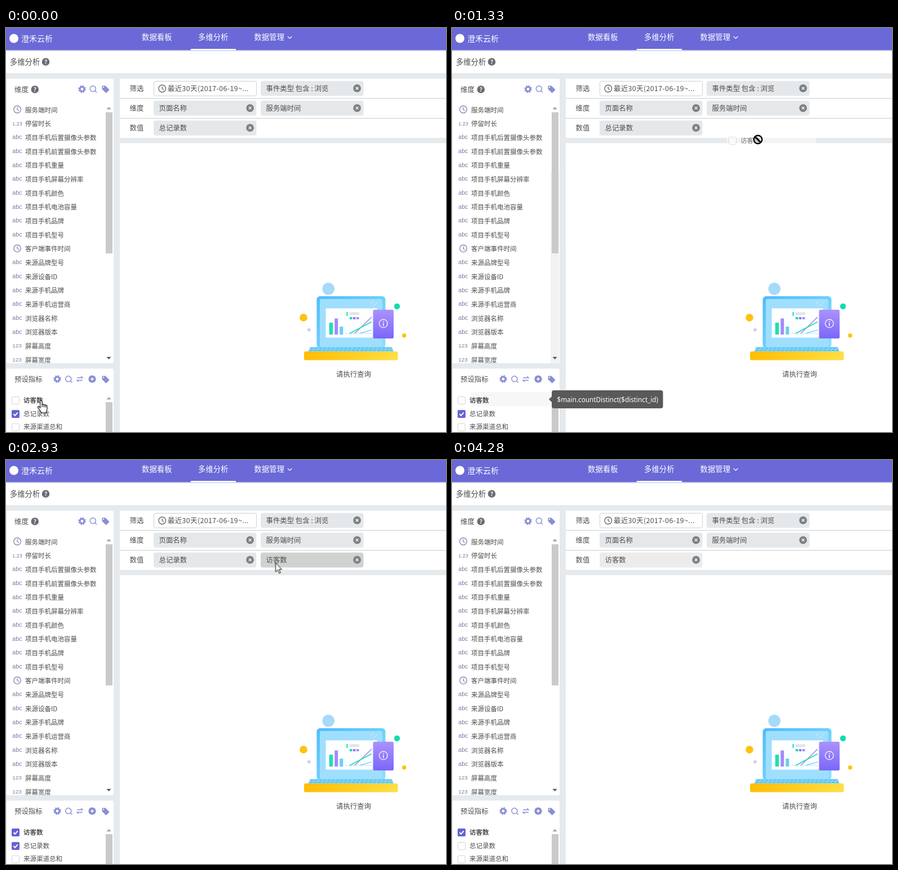
Animation, 781 px wide and 717 px high, one loop 4.96 s. Source, as an HTML page:

```html
<!DOCTYPE html>
<html lang="zh-CN">
<head>
<meta charset="utf-8">
<title>多维分析</title>
<style>
html, body { margin: 0; width: 100%; height: 100%; overflow: hidden; background: #e6eaed; }
svg { display: block; }
text { font-family: "Noto Sans CJK SC", "Noto Sans CJK", "Noto Sans", sans-serif; fill: #4c4c4c; white-space: pre; }
.nav { font-size: 13.4px; fill: #fff; font-weight: 500; }
.crumb { font-size: 13.3px; }
.mid { font-size: 12.4px; }
.small { font-size: 11.5px; }
.type { font: 10.6px "Liberation Sans", Arial, sans-serif; fill: #787ca6; }
.line { fill: none; stroke: #8a8ed2; stroke-width: 1.4; }
.solid { fill: #8a8ed2; }

.anim { animation: 4960ms step-end infinite; }
#hand { animation-name: hand; }
#arrow { animation-name: arrow; }
#nodrop { animation-name: nodrop; }
#ghost { animation-name: ghost; }
#insert { animation-name: insert; }
#tip { animation-name: tip; }
#hover { animation-name: hover; }
#track { animation-name: track; }
#second { animation-name: second; }
#first rect { animation: firstFill 4960ms step-end infinite; }
#second rect { animation: secondFill 4960ms step-end infinite; }
#total, #totalTick { animation-name: total; }
#totalTick { animation-name: totalTick; }
#guest { animation-name: guest; }
#guestTick { animation-name: guestTick; }

@keyframes hand {
  0% { transform: translate(62.5px, 661px); opacity: 1; }
  8.06% { opacity: 0; transform: none; }
  67.54% { transform: translate(437px, 177px); opacity: 1; }
  69.95% { transform: translate(434px, 176.5px); opacity: 1; }
  80.24%, 100% { opacity: 0; transform: none; }
}
@keyframes nodrop {
  0% { opacity: 0; transform: none; }
  8.06% { transform: translate(88px, 648px); opacity: 1; }
  10.48% { transform: translate(160px, 575px); opacity: 1; }
  12.9% { transform: translate(242px, 491px); opacity: 1; }
  15.92% { transform: translate(303px, 415px); opacity: 1; }
  18.95% { transform: translate(390px, 330px); opacity: 1; }
  21.57% { transform: translate(470px, 265px); opacity: 1; }
  23.99% { transform: translate(524px, 222px); opacity: 1; }
  26.81% { transform: translate(543px, 198px); opacity: 1; }
  29.23%, 100% { opacity: 0; transform: none; }
}
@keyframes ghost {
  0% { opacity: 0; transform: none; }
  8.06% { transform: translate(42px, 650px); opacity: .75; }
  10.48% { transform: translate(114px, 578px); opacity: .75; }
  12.9% { transform: translate(196px, 494px); opacity: .75; }
  15.92% { transform: translate(246px, 429px); opacity: .75; }
  18.95% { transform: translate(338px, 336px); opacity: .75; }
  21.57% { transform: translate(421px, 270px); opacity: .75; }
  23.99% { transform: translate(478px, 225px); opacity: .75; }
  26.81% { transform: translate(498px, 200px); opacity: .75; }
  29.23% { transform: translate(504px, 188px); opacity: .75; }
  31.85% { transform: translate(508px, 184px); opacity: .75; }
  44.95%, 100% { opacity: 0; transform: none; }
}
@keyframes arrow {
  0% { opacity: 0; transform: none; }
  29.23% { transform: translate(550.5px, 184.5px); opacity: 1; }
  31.85% { transform: translate(551.5px, 179.5px); opacity: 1; }
  54.03% { transform: translate(531.5px, 180.5px); opacity: 1; }
  56.45% { transform: translate(502.5px, 181.5px); opacity: 1; }
  59.07% { transform: translate(478.5px, 182.5px); opacity: 1; }
  62.09% { transform: translate(453.5px, 180.5px); opacity: 1; }
  65.12% { transform: translate(444.5px, 178.5px); opacity: 1; }
  67.54% { opacity: 0; transform: none; }
  80.24% { transform: translate(541.5px, 188.5px); opacity: 1; }
  83.26% { transform: translate(642.5px, 197.5px); opacity: 1; }
  86.29%, 100% { opacity: 0; transform: none; }
}
@keyframes insert { 0% { opacity: 0; } 29.23% { opacity: 1; } 47.98%, 100% { opacity: 0; } }
@keyframes tip { 0% { opacity: 0; } 18.95% { opacity: 1; } 51%, 100% { opacity: 0; } }
@keyframes hover { 0% { opacity: 0; } 8.06% { opacity: 1; } 47.98%, 100% { opacity: 0; } }
@keyframes track {
  0% { transform: translateY(600px); }
  12.9% { transform: translateY(483px); }
  18.95% { transform: translateY(253px); }
  47.98%, 100% { transform: translateY(600px); }
}
@keyframes second { 0% { opacity: 0; } 47.98% { opacity: 1; } 77.82%, 100% { opacity: 0; } }
@keyframes secondFill { 0% { fill: #dadddd; } 51% { fill: #d0d2d1; } 65.12%, 100% { fill: #e4e8eb; } }
@keyframes firstFill { 0% { fill: #e4e8eb; } 65.12% { fill: #d0d2d1; } 77.82% { fill: #e6eaec; } 86.29%, 100% { fill: #ececec; } }
@keyframes total { 0% { opacity: 1; } 77.82%, 100% { opacity: 0; } }
@keyframes totalTick { 0% { opacity: 1; } 83.26%, 100% { opacity: 0; } }
@keyframes guest { 0% { opacity: 0; } 77.82%, 100% { opacity: 1; } }
@keyframes guestTick { 0% { opacity: 0; } 47.98% { opacity: .6; } 51%, 100% { opacity: 1; } }
</style>
</head>
<body>
<svg width="781" height="717" viewBox="0 0 781 717">
  <defs>
    <clipPath id="listClip"><rect y="90" width="191" height="504.5"/></clipPath>
    <linearGradient id="lid" x2="1" y2="1"><stop stop-color="#4fbcfb"/><stop offset="1" stop-color="#8fe0fe"/></linearGradient>
    <linearGradient id="gold"><stop stop-color="#ffbd05"/><stop offset="1" stop-color="#ffde45"/></linearGradient>
    <linearGradient id="violet" x2="0" y2="1"><stop stop-color="#ab92fd"/><stop offset="1" stop-color="#7b66f8"/></linearGradient>
    <g id="help"><circle r="6.8" fill="#696d76"/><text y="3.6" text-anchor="middle" font-size="10" font-weight="700" style="fill:#fff">?</text></g>
    <g id="gear" class="line"><circle r="3.8" stroke-width="2.8"/><circle r="5.5" stroke-width="2.4" stroke-dasharray="2.4 1.92"/></g>
    <path id="search" class="line" d="M3 3L6 6M4.3-.7A5 5 0 1 1-5.7-.7A5 5 0 1 1 4.3-.7"/>
    <path id="tag" class="solid" fill-rule="evenodd" d="M-6-6H0L6.5.5Q7 1.2 6.4 1.9L2 6.3Q1.2 7 .5 6.4L-6 0ZM-4.6-3.4a1.2 1.2 0 1 0 2.4 0a1.2 1.2 0 1 0-2.4 0"/>
    <path id="swap" class="line" d="M-5-2.2H5L2-5M5 2.2H-5L-2 5"/>
    <g id="plus"><circle class="solid" r="6.6"/><path d="M-3 0H3M0-3V3" stroke="#fff" stroke-width="1.5"/></g>
    <g id="clock" fill="none" stroke-width="1.2"><circle r="6.3"/><path d="M0-3.8V.5L3 2"/></g>
    <g id="close"><circle r="6.9" fill="#7d8083"/><path d="M-2.3-2.3L2.3 2.3M2.3-2.3L-2.3 2.3" stroke="#fff" stroke-width="1.3"/></g>
    <rect id="box" x="-6.5" y="-6.5" width="13" height="13" rx="2" fill="#fff" stroke="#d4d4d6"/>
    <g id="tick"><rect x="-7" y="-7" width="14" height="14" rx="2" fill="#6563d5"/><path d="M-3.6 0L-1 2.8L3.8-2.6" fill="none" stroke="#fff" stroke-width="1.9"/></g>
    <path id="up" d="M-4 2.2L0-2L4 2.2Z"/>
  </defs>

  <!-- page header -->
  <rect width="781" height="717" fill="#e6eaed"/>
  <rect y="39" width="781" height="41" fill="#fff"/>
  <rect width="781" height="39.5" fill="#6a69d7"/>
  <rect y="39.5" width="781" height="1.5" fill="#cfd2ea"/>
  <circle cx="14" cy="18.5" r="8" fill="#fff"/>
  <text x="27" y="23.5" font-size="14" style="fill:#fff">澄禾云析</text>
  <text class="nav" x="241" y="21">数据看板</text>
  <text class="nav" x="341" y="21">多维分析</text>
  <text class="nav" x="440.5" y="21">数据管理</text>
  <path d="M500 15L503.7 18.7L507.4 15" fill="none" stroke="#fff" stroke-width="1.3"/>
  <rect x="328" y="37" width="80" height="2.6" fill="#fff"/>
  <text class="crumb" x="7" y="64.8">多维分析</text>
  <use href="#help" x="70.5" y="60"/>

  <!-- dimension list -->
  <rect x="1" y="90" width="190" height="505" rx="2" fill="#fff"/>
  <text class="mid" x="15" y="113.5">维度</text>
  <use href="#help" x="51.3" y="109"/>
  <use href="#gear" x="135" y="108.5"/>
  <use href="#search" x="155" y="108.5"/>
  <use href="#tag" x="176.5" y="108.5"/>
  <g clip-path="url(#listClip)">
    <rect id="track" class="anim" x="175" width="15" height="345" fill="#f2f2f2"/>
    <g id="list"></g>
  </g>
  <use href="#up" x="182.5" y="142" fill="#a0a0a0"/>
  <rect x="177" y="149.5" width="12" height="250.5" fill="#cacaca"/>
  <use href="#up" transform="translate(182.5 586) scale(1 -1)" fill="#505050"/>

  <!-- preset metrics -->
  <rect x="1" y="604.5" width="190" height="115" rx="2" fill="#fff"/>
  <text class="mid" x="15" y="628.3">预设指标</text>
  <use href="#gear" x="91" y="623"/>
  <use href="#search" x="111.5" y="623.5"/>
  <use href="#swap" x="131" y="623"/>
  <use href="#plus" x="153" y="623"/>
  <use href="#tag" x="176.5" y="623.5"/>
  <rect id="hover" class="anim" x="34" y="646" width="142" height="25" fill="#f7f7f7"/>
  <use href="#box" x="17" y="661"/>
  <use href="#box" x="17" y="685"/>
  <use href="#box" x="17" y="708.5"/>
  <g id="guestTick" class="anim"><use href="#tick" x="17" y="661"/></g>
  <g id="totalTick" class="anim"><use href="#tick" x="17" y="685"/></g>
  <text class="small" x="31" y="665" font-weight="700">访客数</text>
  <text class="small" x="31" y="688.8">总记录数</text>
  <text class="small" x="31" y="712.3">来源渠道总和</text>
  <use href="#up" x="182.5" y="657" fill="#a0a0a0"/>
  <rect x="177" y="664" width="12" height="53" fill="#cacaca"/>

  <!-- query bar -->
  <rect x="202" y="90" width="579" height="105" fill="#fff"/>
  <path d="M202 125H781M202 160.3H781" stroke="#c6cacd"/>
  <text class="mid" x="219.5" y="112">筛选</text>
  <text class="mid" x="219.5" y="147">维度</text>
  <text class="mid" x="219.5" y="182.3">数值</text>
  <rect x="262.5" y="94.5" width="182" height="26" rx="3" fill="#fff" stroke="#cdd0d2"/>
  <use href="#clock" x="277.3" y="107.5" stroke="#555"/>
  <text class="mid" x="287" y="112" letter-spacing=".4">最近30天(2017-06-19~...</text>
  <g id="chips"></g>

  <!-- empty result -->
  <rect x="202" y="204.5" width="579" height="513" fill="#fff"/>
  <circle cx="572.3" cy="462.8" r="10.8" fill="#a5daf9"/>
  <circle cx="528" cy="514" r="6.8" fill="#ffc20c"/>
  <circle cx="538" cy="535.7" r="2.9" fill="#d2caf8"/>
  <circle cx="694" cy="494" r="5.2" fill="#11dcae"/>
  <circle cx="706.7" cy="545.8" r="3.7" fill="#ffc20c"/>
  <rect x="551.5" y="476" width="122" height="92" rx="6" fill="url(#lid)"/>
  <rect x="557" y="481" width="111" height="85" rx="3" fill="#9fdffd"/>
  <path d="M646 490l6-6M652 494l7-7" stroke="#d4f1ff"/>
  <rect x="567.5" y="497.5" width="91" height="52" fill="#fcfeff"/>
  <path d="M577 544V523M577 544" stroke="#20dfae" stroke-width="6.5"/>
  <path d="M586.3 544V515.5" stroke="#a48bf8" stroke-width="6"/>
  <path d="M595.3 544V530" stroke="#6bcdfb" stroke-width="6"/>
  <path d="M605.5 504V511" stroke="#19dbab" stroke-width="2"/>
  <rect x="610" y="504.5" width="17" height="5" fill="#dfe6e6"/>
  <rect x="610" y="513" width="4.5" height="4" fill="#19dbab"/>
  <rect x="616" y="513" width="4.5" height="4" fill="#8d78f3"/>
  <rect x="622" y="513" width="4.5" height="4" fill="#a48bf8"/>
  <path d="M602 542H650" stroke="#b9e6fb"/>
  <path d="M619 542L649 513" stroke="#9a86f6" stroke-width="1.5"/>
  <path d="M610 542L649 521.5" stroke="#19dbab" stroke-width="1.5"/>
  <path d="M628 542L649 536" stroke="#7fd2fb" stroke-width="1.5"/>
  <rect x="651.5" y="500" width="36.5" height="51" rx="2.5" fill="url(#violet)"/>
  <circle cx="669.8" cy="524.5" r="7.3" fill="none" stroke="#fff" stroke-width="1.2"/>
  <path d="M669.8 520V521.8M669.8 523.3V529" stroke="#fff" stroke-width="1.5"/>
  <path d="M540 566H685L688 575H536Z" fill="#7dd6fd"/>
  <path d="M541 568.5H684M539 572H686" stroke="#4db9f6" stroke-width="1.6" stroke-dasharray="5 2.5"/>
  <rect x="529" y="574" width="166.5" height="15.5" rx="3" fill="url(#gold)"/>
  <text class="mid" x="617" y="619.3" text-anchor="middle">请执行查询</text>

  <!-- drag feedback -->
  <path id="insert" class="anim" d="M446 152.5H451V158H454L448.5 164.5L443 158H446Z" fill="#5d5f61"/>
  <g id="tip" class="anim">
    <path d="M172 659L177.5 653.5V664.5Z" fill="#595959"/>
    <rect x="177" y="643" width="197.5" height="32" rx="4" fill="#595959"/>
    <text x="186.5" y="663.6" style="font:11.7px 'Noto Sans','Open Sans',sans-serif;fill:#fff">$main.countDistinct($distinct_id)</text>
  </g>
  <g id="ghost" class="anim">
    <rect x="-10" y="-12" width="158" height="24" fill="#fff" opacity=".6"/>
    <use href="#box"/>
    <text class="small" x="14" y="4.2">访客数</text>
  </g>
  <g id="nodrop" class="anim" fill="none">
    <circle r="7.5" stroke="#fff" stroke-width="4"/>
    <path d="M-5-5L5 5" stroke="#000" stroke-width="2.6"/>
    <circle r="7.3" stroke="#000" stroke-width="2.4"/>
  </g>
  <path id="arrow" class="anim" d="M0 0V16L3.7 12.6L6.4 18.6L8.8 17.6L6.2 11.7H11Z" fill="#fff" stroke="#000"/>
  <g id="hand" class="anim" fill="#fff" stroke="#000" stroke-width="1.1">
    <path d="M-1.8 2C-1.8-.5 1.8-.5 1.8 2V8C2 6.3 4.9 6.5 5 8.5C5.3 7 8 7.4 8 9.3C8.4 8.2 10.5 8.6 10.5 10.5V15C10.5 17.5 8.7 18.5 8.7 22H.2C0 19-4.5 16-5.8 12.5C-6.3 10.2-4 9.6-1.8 13Z"/>
    <path d="M1.8 8V12M5 8.5V12M8 9.3V12.5" fill="none"/>
  </g>
</svg>
<script>
const put = (id, html) => { document.getElementById(id).innerHTML = html; };

const phone = ['后置摄像头参数', '前置摄像头参数', '重量', '屏幕分辨率', '颜色', '电池容量', '品牌', '型号'];
const rows = [
  ['clock', '服务端时间'], ['1.23', '停留时长'],
  ...phone.map(name => ['abc', '项目手机' + name]),
  ['clock', '客户端事件时间'],
  ...['来源品牌型号', '来源设备ID', '来源手机品牌', '来源手机运营商', '浏览器名称', '浏览器版本'].map(name => ['abc', name]),
  ['123', '屏幕高度'], ['123', '屏幕宽度']
];
const typeSize = { abc: 10.6, '123': 9.8, '1.23': 9 };

put('list', rows.map(([type, name], i) => {
  const y = 145.5 + 24.67 * i;
  const icon = type === 'clock'
    ? `<use href="#clock" x="20" y="${y - 1}" stroke="#787ca6"/>`
    : `<text class="type" x="11.3" y="${y + 2.6}" style="font-size:${typeSize[type]}px">${type}</text>`;
  return `${icon}<text class="small" x="34" y="${y + 4.2}">${name}</text>`;
}).join(''));

const chip = (col, row, label, id = '') => {
  const x = 262 + 190 * col, y = 94 + 35.1 * row;
  return `<g id="${id}" class="anim">
    <rect x="${x}" y="${y}" width="182.5" height="26.5" rx="4" fill="#e4e8eb"/>
    ${label && `<text class="mid" x="${x + 9.5}" y="${y + 18}">${label}</text>`}
    <use href="#close" x="${x + 171.2}" y="${y + 13}"/></g>`;
};
const value = (id, label) => `<text id="${id}" class="mid anim" x="271.5" y="182.2">${label}</text>`;

put('chips', chip(1, 0, '事件类型 包含 : 浏览') + chip(0, 1, '页面名称') + chip(1, 1, '服务端时间') +
  chip(0, 2, '', 'first') + value('total', '总记录数') + value('guest', '访客数') +
  chip(1, 2, '访客数', 'second'));
</script>
</body>
</html>
```
